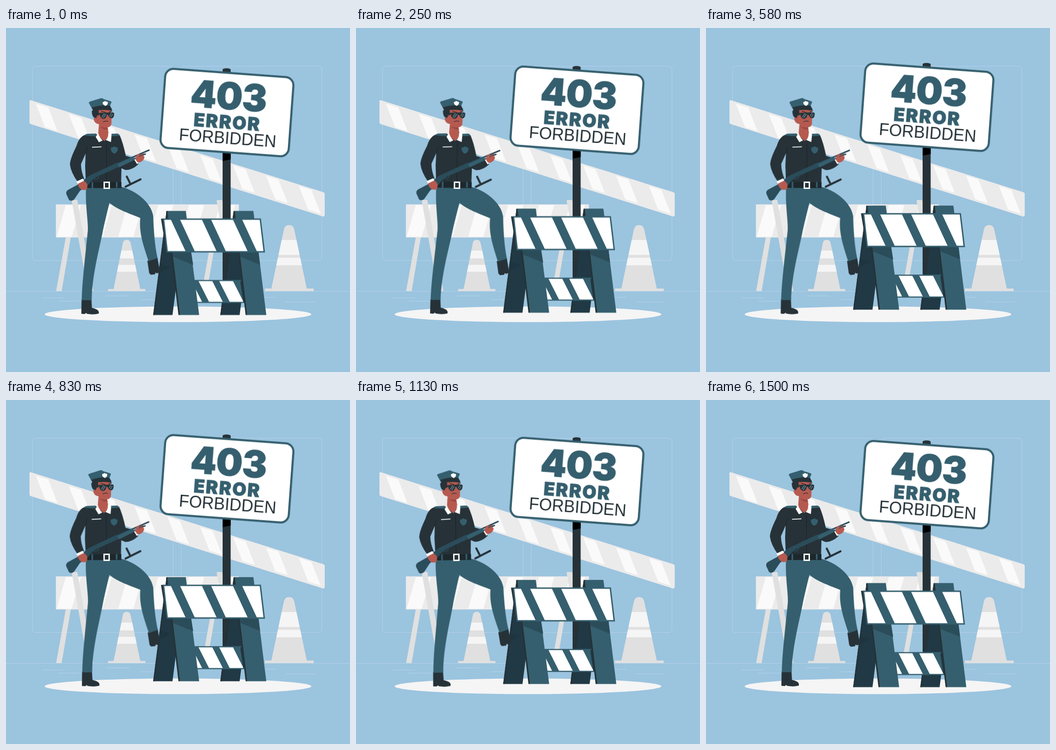
Write an HTML page that moves like this. It is 748 by 748 pixels and loops after 1540 ms.

```html
<!DOCTYPE html>
<html lang="en">
<head>
<meta charset="utf-8">
<title>403 Error Forbidden</title>
<style>
html, body { margin: 0; width: 100%; height: 100%; overflow: hidden; background: #9bc4df; }
svg { display: block; width: 100vw; height: 100vh; }
.line { fill: none; stroke: #b9d4e8; stroke-width: .9; }
.ink { fill: #263238; }
.teal { fill: #355f6e; }
.deep { fill: #203944; }
.shade { fill: #2b4c59; }
.steel { fill: #2b4c5a; }
.skin { fill: #b65a50; }
.white { fill: #fff; }
.pale { fill: #f5f5f5; }
.mist { fill: #ebebeb; }
.grey { fill: #e0e0e0; }
.snow { fill: #fafafa; }
text { text-anchor: middle; }
.heavy { font-family: Inter, "Liberation Sans", sans-serif; font-weight: 900; fill: #355f6e; stroke: #355f6e; stroke-width: 1; }
.plain { font-family: "Liberation Sans", Arial, sans-serif; font-size: 36px; fill: #263238; }
#barrier { animation: hover 1540ms linear infinite; }
#guard { transform-origin: 232px 387px; animation: sway 1540ms linear infinite; }
@keyframes hover {
  0%, 100% { transform: translateY(-.4px); }
  47.4% { transform: translateY(-15px); }
  96.1% { transform: translateY(0); }
}
@keyframes sway {
  0%, 100% { transform: rotate(.05deg); }
  23.05% { transform: rotate(1deg); }
  71.75% { transform: rotate(-1deg); }
  96.1% { transform: rotate(0deg); }
}
</style>
</head>
<body>
<svg viewBox="0 0 748 748">
  <rect width="748" height="748" fill="#9bc4df"/>

  <g class="line">
    <rect x="57.5" y="83" width="306" height="422.5" rx="7"/>
    <rect x="381" y="83" width="306" height="422.5" rx="7"/>
    <path d="M0 572.5H748M78 587H128M114 594H182M218 582.5H269M293 591H335M560 585.5H588M608 595.5H672"/>
  </g>

  <path class="mist" d="M54 157L690 357Q693 358 693 361V407Q692 411 688 409.500L54 209Q51 208 51 205V159Q51 156.500 54 157Z"/>
  <g id="tape" class="snow"></g>

  <g id="rear">
    <path class="grey" d="M130 455H141L121 572H109ZM447 455H457L437 572H426Z"/>
    <rect class="mist" x="108.500" y="383.500" width="398" height="72"/>
    <g id="rearSlats" class="snow"></g>
    <path class="grey" d="M144 374H155L190 572H178L143 376ZM459 374H470L505 572H493L458 376Z"/>
  </g>

  <g id="smallCone">
    <path class="grey" d="M222 567.500H234L254 468Q255 460.500 262.500 460.500Q269.500 460.500 271 468L292 567.500H303V572H222Z"/>
    <path class="pale" d="M251 484H274.500L278 501H247.500ZM244.600 515H280.900L284 530H241.500Z"/>
  </g>
  <g id="bigCone">
    <path class="grey" d="M563 566.500H577L604.500 437Q606.500 428.500 615.500 428.500Q624.500 428.500 626.500 437L654 566.500H669V572H563Z"/>
    <path class="pale" d="M599.500 461H631.500L638.500 493.500H592.500ZM591.300 499.500H639.700L643.200 516H587.800Z"/>
  </g>

  <ellipse class="pale" cx="374" cy="622.500" rx="290" ry="17"/>

  <g id="barrier">
    <path class="ink" d="M471 90.500Q472 88 479.500 88T488.500 90.500V560H471Z"/>
    <path d="M471 262H488.500V286L471 289.500Z"/>
    <g transform="rotate(4.2 480.5 184.3)">
      <rect x="340.700" y="98" width="279.600" height="172.600" rx="18" fill="#fff" stroke="#355f6e" stroke-width="4.500"/>
      <text class="heavy" x="481.500" y="176.800" font-size="81" letter-spacing="-1">403</text>
      <text class="heavy" x="482.500" y="218.600" font-size="39.5" letter-spacing="2.4">ERROR</text>
      <text class="plain" x="486" y="252.400">FORBIDDEN</text>
    </g>

    <path class="deep" d="M349 398.500H391L362 624.500H320ZM495 398.500H537L508 624.500H466Z"/>
    <path class="ink" d="M349 398.500H352L323 624.500H320ZM495 398.500H498L469 624.500H466Z"/>
    <path d="M334 514L358 520L333 533Z" fill="#1e353f"/>
    <path d="M408 549.500H517L521 597H413Z" fill="#fff" stroke="#355f6e" stroke-width="2.500"/>
    <g id="lowSlats" class="teal"></g>
    <path class="deep" d="M509 550H517L521 596H516Z"/>
    <path class="ink" d="M348 399H351L379 624.500H375ZM495 399H498L525 624.500H521Z"/>
    <path class="teal" d="M351 398.500H391L420 624.500H378.500ZM497.500 398.500H538L566 624.500H524.500Z"/>
    <path class="shade" d="M361.500 487H402.500L407 515.500L363.500 498ZM508 487H549L552.500 515L510 498Z"/>
    <path class="ink" d="M337 415H345L352 488H349Z"/>
    <path d="M342.500 416H553L561.500 487H350.500Z" fill="#fff" stroke="#355f6e" stroke-width="3"/>
    <g id="boardSlats" class="teal"></g>
  </g>

  <g id="guard">
    <g fill="none" stroke="#263238" stroke-linecap="round" stroke-width="4.300">
      <path d="M260 345L292.500 329M262.500 323L269.500 337"/>
    </g>
    <path class="ink" d="M164.500 590H186L187 608.500Q201 611.500 202 617V621Q190 624 176 621.500L174.500 619.500L171.500 622L164 621.500Z"/>
    <path class="ink" d="M307.500 506Q320 503.500 329.500 499.500L334.500 529Q333 532.500 328 533.500L325.500 531.500L324 535.500L315 536.500L311.500 533Z"/>
    <path class="teal" d="M174 346L250 345C281 353 315 378 320 408C321.500 440 323 470 329.500 500L310 507C298 470 289 445 292 413C270 404 240 394 225 380C222 392 214 425 210 445C203 480 187 540 186.500 592H165C165 560 172 500 178 440C179 420 172 385 174 346Z"/>

    <path class="ink" d="M173 232L200 231L213 244L226 231L247 233Q254 248 260.500 278L282 284L288 296Q273 310 259 308.500L251 305L250 346H174L172 300L173 273L163 296Q163 311 170 328L156 335Q141 314 139 297Q139 285 153 257Q159 236 173 232Z"/>
    <path d="M218.500 249V335M173 273L177 258" fill="none" stroke="#172126" stroke-width="1"/>
    <path class="teal" d="M170 234Q173 229.500 180 230L196 229.500L195 235.500Q182 235 170 234ZM229 230L242 229.500Q247 231 247 234L230 235.500Z"/>
    <path class="white" d="M187 258.500L207.500 257.500V259.300L187 260.300Z"/>
    <path class="teal" d="M235.500 257Q239 260.500 243 260Q244 270 235.500 273.500Q227 270 228 260Q232 260.500 235.500 257Z"/>

    <path class="skin" d="M197 179L228 175L229.500 193L229 209Q227 215.500 220.500 216Q223 225 223 236L214 246L200 234L202 209Q195 209 191.500 202Q189 195 194 193Z"/>
    <path d="M204 214Q212 217 220.500 216L222 221Q211 222 204 214Z" fill="#9d4a43"/>
    <path class="ink" d="M186.500 180L201 176L202 190L198 190.500L196 196L190 194Q186 188 186.500 180Z"/>
    <path d="M211 204.500Q216 201 222 203.500" fill="none" stroke="#263238" stroke-width="1.300"/>
    <path d="M207 181L217 184M224 183L231 180" fill="none" stroke="#263238" stroke-width="1.600"/>
    <path class="ink" d="M199 186L204 184.500L232 183.500Q235.500 184 235 188Q234 196 230 196.500Q224 196 221.500 189L219 189Q218 197 212 198Q205 197 203.500 188L199 188Z"/>
    <path d="M208 194L214 185.500M211 196L217 187M225 192L229 185M228 194L232 187" stroke="#718791" stroke-width="1.500"/>
    <path class="teal" d="M180 163Q180 160 184 159.500L205 153Q209 151.500 212 154.500L228 159.500Q230 161 228 164L225 172Q205 169 187 176Z"/>
    <path class="ink" d="M186.500 173Q206 166.500 226 169L228 173Q232 178 229 179.500Q209 176 189 180.500Z"/>
    <path class="white" d="M215 158.500Q217.500 161 221 160.500Q222 167 216 169.500Q209.500 167 210 161Q213 161 215 158.500Z"/>
    <path class="white" d="M200 228L195 237L202 248.500L210 244.500Q203 238 200 228ZM222 229L229.500 231.500L228 248L217 243.500Q223 237 222 229Z"/>

    <rect x="174" y="335" width="77" height="13" fill="#1d282d"/>
    <path class="teal" d="M186 335H189.500V348H186ZM239 335H242.500V347H239Z"/>
    <rect x="213.500" y="335.500" width="11" height="13" fill="#263238" stroke="#fff" stroke-width="3"/>

    <ellipse cx="195" cy="323" rx="6.500" ry="5.500" fill="none" stroke="#2b4c5a" stroke-width="1.600"/>
    <path class="steel" d="M135 352L161 338Q177 322 188 318L241 293L246 302L203 321Q189 326 179 341L161 354L148 373Q142 378 137 374L131 361Q130 355 135 352Z"/>
    <path d="M238 297L312 265M246 299L304 273.500" fill="none" stroke="#2b4c5a" stroke-width="3"/>
    <path class="teal" d="M242 296L276 280L279 287L246 303Z"/>
    <path class="white" d="M153 334L167 327.500L170 333L156.500 339.500ZM279 286.500L282 283.500L288 293L285 296Z"/>
    <path class="skin" d="M156 339L169 332.500Q175 335 177 341L176.500 349Q172 354 166 352Q158 349 156 339Z"/>
    <path class="skin" d="M281 285L284 276Q288 273 294 272.500L298 270.500Q300.500 273 298 277L301 280Q300 287 295 290Q289 294 285 291Z"/>
    <path d="M289 279L302 273.500M290 275L300 270.500" stroke="#2b4c5a" stroke-width="1.600"/>
  </g>
</svg>
<script>
// Fills a group with evenly spaced slanted stripes.
function slats(id, { x, y, w, h, lean, step, n, slope = 0 }) {
  let d = "";
  for (let i = 0; i < n; i++) {
    const left = x + i * step;
    const at = (dx, dy) => `${left + dx} ${y + dy + (i * step + dx) * slope}`;
    d += `M${at(0, 0)}L${at(w, 0)}L${at(w + lean, h)}L${at(lean, h)}Z`;
  }
  document.getElementById(id).innerHTML = `<path d="${d}"/>`;
}
slats("tape", { x: 65, y: 164.5, w: 27, h: 45, lean: 20, step: 71.5, n: 9, slope: .313 });
slats("rearSlats", { x: 130, y: 385, w: 33, h: 69, lean: -20, step: 67, n: 6 });
slats("boardSlats", { x: 358, y: 416, w: 20, h: 71, lean: 33, step: 67.5, n: 3 });
slats("lowSlats", { x: 403, y: 549.5, w: 15, h: 47.5, lean: 24, step: 45, n: 3 });
</script>
</body>
</html>
```
